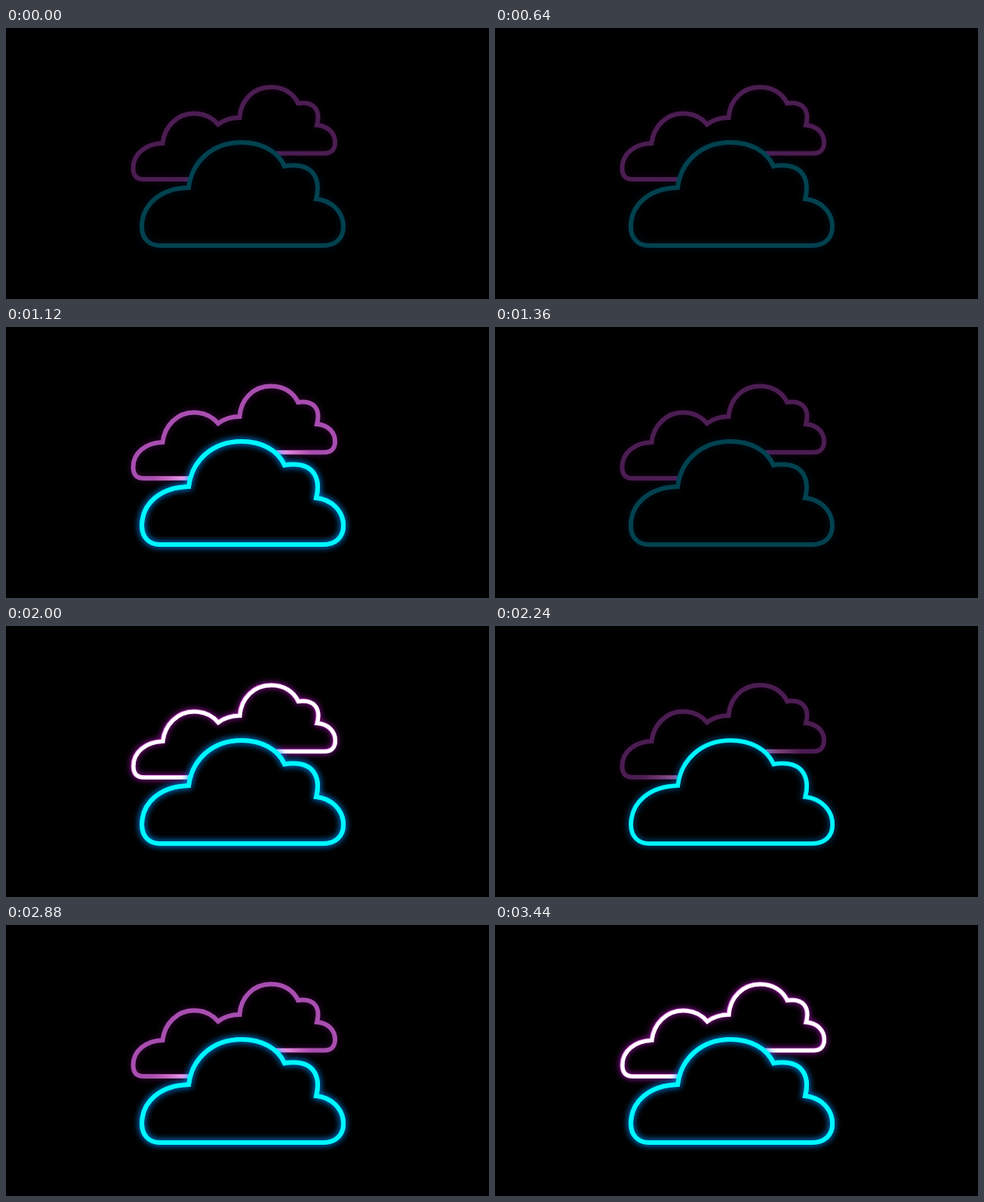
Recreate the animation shown at these times as an HTML page. Size 640x360 px, loop 4160 ms.

```html
<!DOCTYPE html>
<html lang="en">
<head>
<meta charset="utf-8">
<title>Neon clouds</title>
<style>
  html, body { margin: 0; width: 100%; height: 100%; overflow: hidden; background: #000; }
  svg { display: block; width: 100vw; height: 100vh; }
  path { fill: none; stroke-linejoin: miter; }
</style>
</head>
<body>
<svg viewBox="0 0 640 360">
  <defs>
    <path id="back" d="M358 166.5H422C431 166.5 436 161 436 152C436 140 427 130 412 129C417 110 409 97 387 100C381 87 368 78.5 351 78.5C328 78.5 311 96 309.5 119C299 119 289 122 281 128C273 118.5 262 113.5 249 113.5C227 113.5 210 131 207.5 153C185 154 168.5 167 168.5 186C168.5 196 173 201 183 201H243"/>
    <path id="front" d="M204 289H420C437 289 447 279 447 264C447 244 431 229 411 227C417 203 409 182 380 182.5Q374 182.5 369 183.5C360 163 338 152 312 152C273 152 246 178 242 212C205 213 180 234 180 264C180 280 190 289 204 289Z"/>
    <filter id="blur" filterUnits="userSpaceOnUse" x="120" y="40" width="380" height="300" color-interpolation-filters="sRGB">
      <feGaussianBlur stdDeviation="4"/>
    </filter>
    <linearGradient id="shineLeft" gradientUnits="userSpaceOnUse" x1="195" x2="240">
      <stop stop-color="#f8c" stop-opacity="0"/><stop offset="1" stop-color="#fbf"/>
    </linearGradient>
    <linearGradient id="shineRight" gradientUnits="userSpaceOnUse" x1="360" x2="405">
      <stop stop-color="#fbf"/><stop offset="1" stop-color="#f8c" stop-opacity="0"/>
    </linearGradient>
  </defs>
  <rect width="640" height="360"/>
  <use id="backGlow" href="#back" stroke="#d21ce0" stroke-width="7" filter="url(#blur)"/>
  <use id="backBase" href="#back" stroke-width="6"/>
  <use id="backCore" href="#back" stroke="#fff" stroke-width="5" x=".5" y=".3"/>
  <g id="shine" stroke-width="5">
    <path d="M195 201H243" stroke="url(#shineLeft)"/>
    <path d="M358 166.5H405" stroke="url(#shineRight)"/>
  </g>
  <use id="frontGlow" href="#front" stroke="#0090ff" stroke-width="8" filter="url(#blur)"/>
  <use id="frontBase" href="#front" stroke-width="6"/>
  <use id="frontCore" href="#front" stroke="#00f8ff" stroke-width="5.2" x=".4"/>
</svg>
<script>
const LOOP = 4160, STEP = 80;
const part = id => document.getElementById(id);

const looks = {
  dim:  { back: '#4b1d52', backCore: 0, backGlow: .1, front: '#02424f', frontCore: 0, frontGlow: .1, shine: 0 },
  low:  { back: '#4b1d52', backCore: 0, backGlow: .1, front: '#00a9bd', frontCore: 1, frontGlow: .5, shine: .4 },
  mid:  { back: '#a84eb0', backCore: 0, backGlow: .25, front: '#00f8ff', frontCore: 1, frontGlow: .9, shine: .9 },
  full: { back: '#e66ee6', backCore: 1, backGlow: .7, front: '#00f8ff', frontCore: 1, frontGlow: .9, shine: 0 }
};
looks.soft = { ...looks.full, backCore: .9, frontGlow: .8 };

// Each burst holds one look per step; the last look stays until the next burst.
const bursts = [
  { at: 0, names: 'dim' },
  { at: 800, names: 'low full mid full mid low dim' },
  { at: 2000, names: 'full mid full low full mid low' },
  { at: 2560, names: 'full mid low full mid low full' },
  { at: 3360, names: 'soft full' }
].map(({ at, names }) => ({ at, names: names.split(' ') }));

function lookAt(time) {
  const { at, names } = bursts.findLast(burst => burst.at <= time);
  const index = Math.min(names.length - 1, Math.floor((time - at) / STEP));
  return looks[names[index]];
}

function draw(time) {
  const look = lookAt(time);
  for (const cloud of ['back', 'front']) {
    part(cloud + 'Base').setAttribute('stroke', look[cloud]);
    for (const layer of ['Core', 'Glow'])
      part(cloud + layer).setAttribute('opacity', look[cloud + layer]);
  }
  part('shine').setAttribute('opacity', look.shine);
}

const start = performance.now();
function tick(now) {
  draw(Math.max(0, now - start) % LOOP);
  requestAnimationFrame(tick);
}
tick(start);
</script>
</body>
</html>
```
